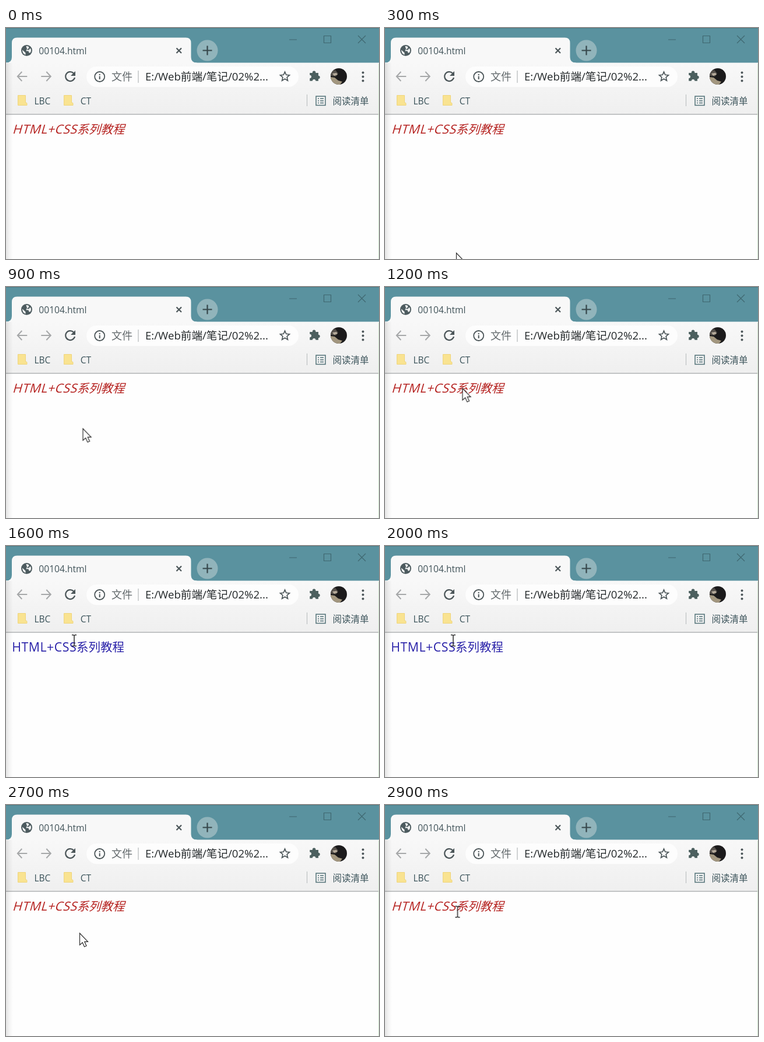
An HTML page that plays this animation: 640 by 396 pixels, repeating every 3 s.

```html
<!DOCTYPE html>
<html lang="zh-CN">
<head>
<meta charset="utf-8">
<title>00104.html</title>
<style>
  html, body { margin: 0; width: 100%; height: 100%; overflow: hidden; background: #fff; }
  svg { display: block; width: 100vw; height: 100vh; }
  text { font-family: "Open Sans", "Noto Sans CJK SC", "Noto Sans CJK", "Noto Sans CJK JP", sans-serif; }
  .line { fill: none; stroke: #4c5659; stroke-width: 2.2; }

  .cursor, .arrow, .beam, .idle, .hover { animation: 3s step-end infinite; }
  .cursor { animation-name: move; }
  .arrow { animation-name: arrow; }
  .beam { animation-name: beam; }
  .idle { animation-name: idle; }
  .hover { animation-name: hover; }

  @keyframes move {
    0% { transform: translate(118px, 400px); }
    10% { transform: translate(122px, 385px); animation-timing-function: steps(2); }
    16.6% { transform: translate(130.5px, 311px); }
    20% { transform: translate(130.5px, 311px); animation-timing-function: steps(6); }
    40% { transform: translate(132.5px, 173px); }
    43.3% { transform: translate(120px, 163px); }
    46.6% { transform: translate(117px, 162px); }
    70% { transform: translate(126px, 219px); }
    73.3% { transform: translate(126px, 212px); }
    76.6% { transform: translate(127px, 183px); }
    80% { transform: translate(126px, 178px); }
    83.3% { transform: translate(126px, 216px); }
    90% { transform: translate(126px, 219px); }
    93.3% { transform: translate(125px, 203px); }
    96.6%, 100% { transform: translate(124.5px, 183px); }
  }
  @keyframes arrow {
    0%, 43.3%, 76.6%, 96.6%, 100% { visibility: hidden; }
    10%, 70%, 83.3% { visibility: visible; }
  }
  @keyframes beam {
    0%, 70%, 83.3% { visibility: hidden; }
    43.3%, 76.6%, 96.6%, 100% { visibility: visible; }
  }
  @keyframes idle {
    0%, 70%, 83.3%, 100% { visibility: visible; }
    43.3%, 80% { visibility: hidden; }
  }
  @keyframes hover {
    0%, 70%, 83.3%, 100% { visibility: hidden; }
    43.3%, 80% { visibility: visible; }
  }
</style>
</head>
<body>
<svg viewBox="0 0 640 396" preserveAspectRatio="none">
  <defs>
    <linearGradient id="bar" x2="0" y2="1">
      <stop stop-color="#f8f8f8"/><stop offset="1" stop-color="#efefef"/>
    </linearGradient>
    <linearGradient id="edge">
      <stop stop-opacity=".1"/><stop offset=".5" stop-opacity=".04"/><stop offset="1" stop-opacity="0"/>
    </linearGradient>
    <clipPath id="round"><circle cx="571" cy="83" r="14"/></clipPath>
    <g id="folder">
      <path d="M.5 .5H13.500V13H14.500Q16 13 16 14.500V17.500H.5Z" fill="#f9e391" stroke="#efd57c"/>
    </g>
    <g id="back">
      <path d="M9 -8L1.500 0L9 8M1.500 0H18" fill="none" stroke="#a6a8a9" stroke-width="2"/>
    </g>
    <g id="heading">
      <text font-size="21.3" letter-spacing=".5">HTML+CSS</text>
      <text x="110.700" font-size="20.5">系列教程</text>
    </g>
  </defs>

  <!-- title bar -->
  <rect width="640" height="61" fill="#5a929f"/>
  <rect width="640" height="1" fill="#4b7d86"/>
  <path d="M0 59.500Q10 59.500 10 50V25.500Q10 16.500 19 16.500H308.500Q317.500 16.500 317.500 25.500V50Q317.500 59.500 327.500 59.500V62H0Z" fill="#f8f8f8"/>
  <g transform="translate(35.500 38.500)">
    <circle r="9.500" fill="#4d5b5f"/>
    <path d="M-7.500 -1L-2 4V7.500Q-7.500 5.500 -7.500 -1ZM-1 -7.500Q2 -8 4 -6L3 -3L0 -2L-1 1H3L4 4L6 4Q9 0 6 -4L4 -1L1 -1" fill="#f4f6f6"/>
  </g>
  <text x="56.300" y="44.800" font-size="15.6" fill="#42545a">00104.html</text>
  <path class="line" d="M292.500 34.500L301 43M301 34.500L292.500 43"/>
  <circle cx="345.500" cy="38.500" r="18" fill="#91b4bb"/>
  <path class="line" d="M337.500 38.500H353.500M345.500 30.500V46.500" style="stroke:#36474b"/>
  <path d="M486 20H499M545.500 13.500H557.500V25.500H545.500ZM604 13L617 26M617 13L604 26" fill="none" stroke="#3f6770" stroke-width="1.2"/>

  <!-- toolbar -->
  <rect y="59.500" width="640" height="89" fill="url(#bar)"/>
  <use href="#back" transform="translate(18.300 83)"/>
  <use href="#back" transform="translate(78.300 83) scale(-1 1)"/>
  <path class="line" d="M116 77.500A8 8 0 1 0 118 85"/>
  <path d="M119 74V82H111Z" fill="#4c5659"/>
  <rect x="138" y="66" width="364" height="35" rx="17.500" fill="#fdfdfd"/>
  <g transform="translate(160.700 83.500)">
    <circle class="line" r="8.500" style="stroke-width:1.8"/>
    <path class="line" d="M0 -4.500V-2.500M0 -1V4.500" style="stroke-width:2"/>
  </g>
  <text x="181" y="89.500" font-size="18" fill="#62696c">文件</text>
  <rect x="226.500" y="73" width="1" height="21" fill="#a3a8aa"/>
  <text x="239" y="89.500" font-size="18.6" fill="#222729">E:/Web前端/笔记/02%2...</text>
  <path class="line" transform="translate(478.500 83.500) scale(.93)" d="M0 -9L2.400 -3.400L8.500 -2.800L3.900 1.200L5.300 7.200L0 4L-5.300 7.200L-3.900 1.200L-8.500 -2.800L-2.400 -3.400Z" style="stroke-width:1.8"/>
  <path transform="translate(529.500 83.500) scale(.92)" d="M-9 -7H-4V-8A3 3 0 0 1 2 -8V-7H7V-2A3 3 0 0 1 7 4V8H2A3 3 0 0 0 -4 8H-9V3A3 3 0 0 0 -9 -3Z" fill="#4c605f"/>
  <g clip-path="url(#round)">
    <rect x="557" y="69" width="28" height="28" fill="#1b1a1b"/>
    <path d="M557 74L565 72L570 78L566 83L557 82Z" fill="#55504b"/>
    <path d="M557 84L564 85L570 90L577 92L573 97H557Z" fill="#a3977f"/>
    <path d="M560 78L567 77L569 80L563 82Z" fill="#b7ac9c"/>
  </g>
  <g fill="#4c5659">
    <circle cx="612.500" cy="76.500" r="2"/><circle cx="612.500" cy="83.500" r="2"/><circle cx="612.500" cy="90.500" r="2"/>
  </g>

  <!-- bookmarks -->
  <use href="#folder" x="20" y="115"/>
  <use href="#folder" x="99" y="115"/>
  <g font-size="15.5" fill="#3b535a">
    <text x="48.500" y="130.500">LBC</text>
    <text x="127.800" y="130.500">CT</text>
    <text x="560.500" y="130.500">阅读清单</text>
  </g>
  <rect x="516" y="114" width="1" height="20" fill="#b5babb"/>
  <g class="line" transform="translate(531 116)" style="stroke:#527177;stroke-width:1.5">
    <rect x="1" y="1" width="16" height="15.500"/>
    <path d="M4 5H6M8 5H14M4 8.800H6M8 8.800H14M4 12.600H6M8 12.600H14"/>
  </g>

  <!-- page -->
  <rect y="148" width="640" height="248" fill="#fefefe"/>
  <rect y="147.500" width="640" height="1" fill="#8d9293"/>
  <rect y="60" width="12" height="336" fill="url(#edge)"/>
  <rect x="639" y="61" width="1" height="335" fill="#cfe5cc"/>
  <g class="idle" fill="#b5211f"><use href="#heading" transform="translate(10.700 181) skewX(-16)"/></g>
  <g class="hover" fill="#2820a8"><use href="#heading" transform="translate(10.300 181)"/></g>

  <g class="cursor">
    <path class="arrow" d="M.5 .8V21L5.200 16.700L8.500 24L12 22.500L8.800 15.300H14.500Z" fill="#fff" stroke="#2b2b2b" stroke-width="1.2"/>
    <path class="beam" d="M-4 -9.500H-1.500L0 -8.500L1.500 -9.500H4M0 -8.500V8.500M-4 9.500H-1.500L0 8.500L1.500 9.500H4" fill="none" stroke="#2b2b2b" stroke-width="1.5"/>
  </g>
</svg>
</body>
</html>
```
